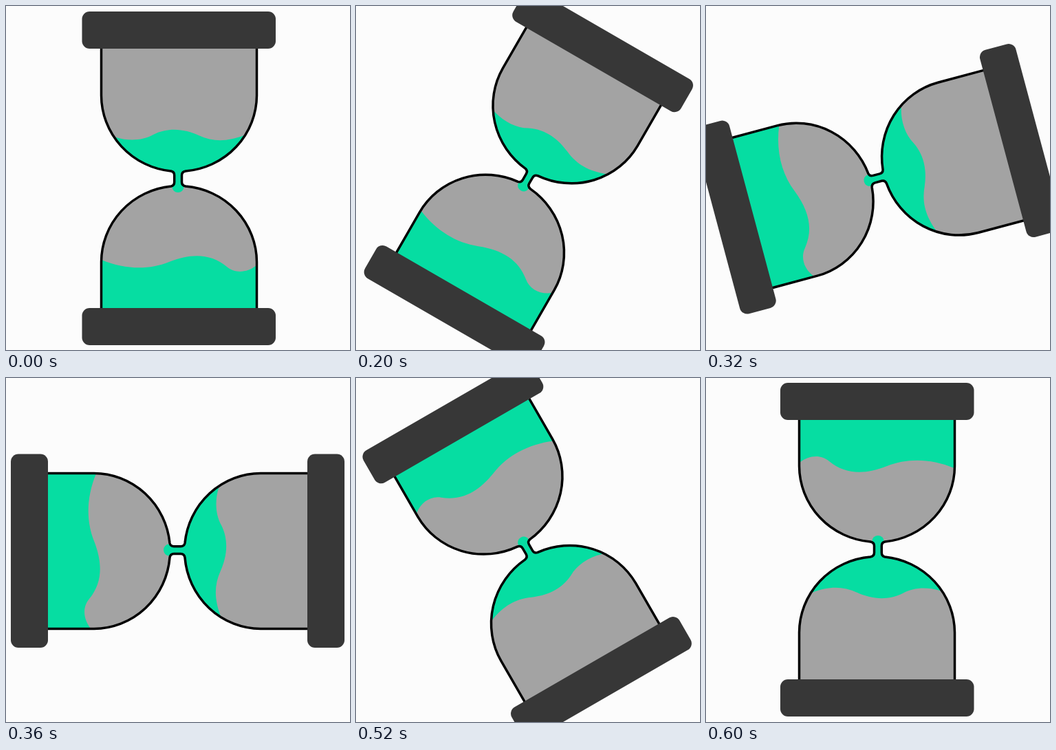
Recreate the animation shown at these times as an HTML page. Size 500x500 px, loop 920 ms.

```html
<!DOCTYPE html>
<html lang="en">
<head>
<meta charset="utf-8">
<title>Hourglass</title>
<style>
  html, body { margin: 0; height: 100%; overflow: hidden; background: #fcfcfc; }
  svg { display: block; width: 100vw; height: 100vh; }
</style>
</head>
<body>
<svg viewBox="0 0 500 500">
  <defs>
    <path id="glass" d="M138.5 59V130A113 111 0 0 0 240 240Q244.7 241 244.7 246V256Q244.7 261 240 262
      A113 111 0 0 0 138.5 372V442H364.5V372A113 111 0 0 0 261 262Q255.5 261 255.5 256V246
      Q255.5 241 261 240A113 111 0 0 0 364.5 130V59Z"/>
    <clipPath id="inside"><use href="#glass"/></clipPath>
  </defs>
  <g id="hourglass">
    <use href="#glass" fill="#a3a3a3"/>
    <g clip-path="url(#inside)" fill="#06dda2">
      <path d="M130 180L160 191C180 197 200 195 214 187C238 175 262 180 280 188C302 198 322 197 346 188L370 180V250H130Z"/>
      <path d="M244 248H256V262H244Z"/>
      <ellipse cx="250" cy="263" rx="8.5" ry="8"/>
      <path d="M130 365L139 369C173 383 207 384 237 372C270 359 298 360 321 379C333 389 350 388 364 377L370 372V445H130Z"/>
    </g>
    <use href="#glass" fill="none" stroke="#000" stroke-width="3.5"/>
    <g fill="#373737">
      <rect x="110.5" y="8" width="281.5" height="54" rx="11"/>
      <rect x="110.5" y="439" width="281.5" height="54" rx="11"/>
    </g>
  </g>
</svg>
<script>
  const LOOP = 920, HOLD = 160, STEP = 40, STEPS = 12;
  const hourglass = document.getElementById('hourglass');

  // Rest upright, then turn half a circle in hard 15 degree steps.
  function draw() {
    const time = performance.now() % LOOP;
    const step = Math.floor((time - HOLD) / STEP) + 1;
    const turn = Math.max(0, Math.min(STEPS, step));
    hourglass.setAttribute('transform', `rotate(${turn * 180 / STEPS} 250 250)`);
    requestAnimationFrame(draw);
  }
  draw();
</script>
</body>
</html>
```
